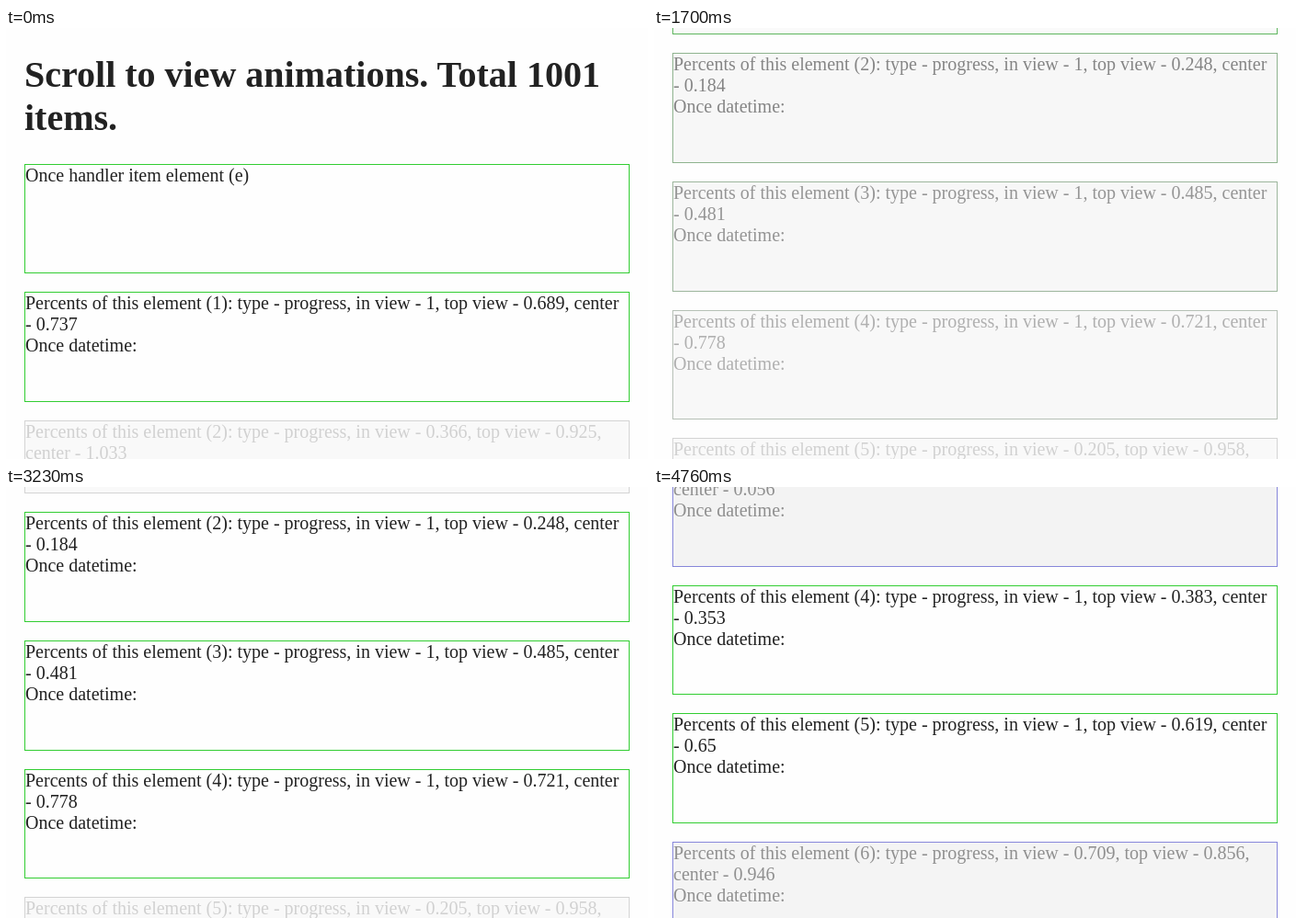
An HTML page that plays this animation: 698 by 469 pixels, repeating every 4.93 s.

```html
<!DOCTYPE html>
<html lang="en">
<head>
<meta charset="utf-8">
<title>Scroll to view animations</title>
<style>
  html, body { margin: 0; width: 100%; height: 100%; overflow: hidden; background: #fefefe; }
  #stage {
    position: relative; width: 698px; height: 469px; overflow: hidden;
    font: 20px/23px "Liberation Serif", "Times New Roman", Times, serif; color: #222;
  }
  h1 {
    position: absolute; left: 20px; top: 27px; width: 658px; margin: 0;
    font-size: 40px; line-height: 47px; font-weight: bold;
  }
  .item {
    position: absolute; left: 20px; top: 0; width: 658px;
    box-sizing: border-box; border: 1px solid; overflow: hidden;
  }
</style>
</head>
<body>
<div id="stage"><h1>Scroll to view animations. Total 1001 items.</h1></div>
<script>
const LOOP = 4930, STEP = 170, FADE = 1000;
const VIEW = 470.85, H = 119.6, PITCH = 139.76, FIRST = 147.26;

// opacity, border rgb, background grey
const LOOK = {
  hidden: [0.2, 51, 51, 51, 234],
  part: [0.5, 16, 16, 184, 234],
  full: [1, 50, 205, 50, 254]
};

// per item: starting look, then [time, look] changes
const ITEMS = [
  ['full'],
  ['full', [1510, 'hidden']],
  ['hidden', [1440, 'full'], [3720, 'hidden']],
  ['hidden', [1480, 'full'], [3780, 'part']],
  ['hidden', [1550, 'full']],
  ['hidden', [3750, 'full']],
  ['hidden', [3790, 'part']]
];

// [start, end, distance]
const SCROLLS = [[1410, 1570, 400], [3710, 3810, 200]];

const clamp = x => Math.min(1, Math.max(0, x));
const num = x => String(+x.toFixed(3));

// cubic-bezier(.25, .1, .25, 1)
function ease(x) {
  let lo = 0, hi = 1;
  for (let i = 0; i < 24; i++) {
    const s = (lo + hi) / 2, r = 1 - s;
    if (0.75 * s * r * r + 0.75 * s * s * r + s * s * s < x) lo = s; else hi = s;
  }
  const s = hi, r = 1 - s;
  return 0.3 * s * r * r + 3 * s * s * r + s * s * s;
}

function lookAt([start, ...changes], t) {
  return changes.reduce((from, [at, name]) => {
    const e = t <= at ? 0 : ease(clamp((t - at) / FADE));
    return from.map((v, i) => v + (LOOK[name][i] - v) * e);
  }, LOOK[start]);
}

function label(i, top) {
  if (i === 0) return 'Once handler item element (e)';
  const shown = clamp(Math.min((VIEW - 0.27 - top) / H, (top + H) / H));
  return `Percents of this element (${i}): type - progress, in view - ${num(shown)}, ` +
    `top view - ${num(clamp((top + H) / (VIEW + H)))}, ` +
    `center -&nbsp;${num((top + H / 2) / VIEW)}<br>Once datetime:`;
}

const stage = document.getElementById('stage');
const title = stage.querySelector('h1');
const boxes = ITEMS.map(() => {
  const box = document.createElement('div');
  box.className = 'item';
  stage.append(box);
  return box;
});

function draw(t) {
  const scroll = SCROLLS.reduce((y, [a, b, d]) => y + d * clamp((t - a) / (b - a)), 0);
  title.style.transform = `translateY(${-Math.round(scroll)}px)`;
  boxes.forEach((box, i) => {
    const top = FIRST + i * PITCH - scroll;
    const y = Math.round(top + 0.4);
    const [alpha, r, g, b, grey] = lookAt(ITEMS[i], t);
    box.innerHTML = label(i, top);
    Object.assign(box.style, {
      top: y + 'px',
      height: Math.round(top + 0.4 + H) - y + 'px',
      opacity: alpha,
      borderColor: `rgb(${r}, ${g}, ${b})`,
      backgroundColor: `rgb(${grey}, ${grey}, ${grey})`
    });
  });
}

let last = -1;
const begin = performance.now();
function tick() {
  const step = Math.floor(((performance.now() - begin) % LOOP) / STEP);
  if (step !== last) draw((last = step) * STEP);
  requestAnimationFrame(tick);
}
tick();
</script>
</body>
</html>
```
